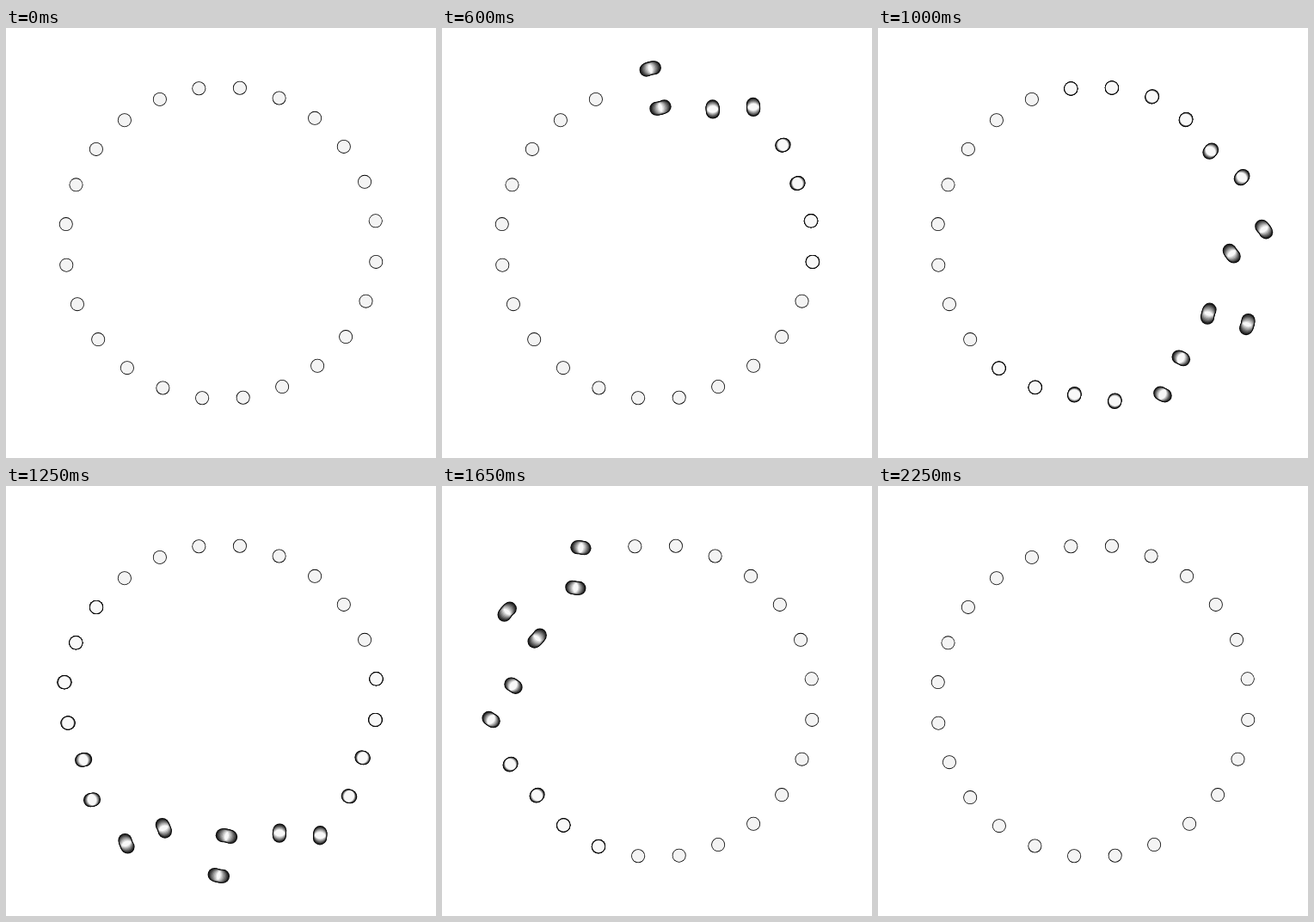
An HTML page with a canvas for the animation above (2.4 s loop, 500 px wide and 500 px high).

```html
<!DOCTYPE html>
<html lang="en">
<head>
<meta charset="utf-8">
<title>Turning pairs</title>
<style>
  html, body { margin: 0; width: 100%; height: 100%; overflow: hidden; background: #fff; }
  canvas { display: block; }
</style>
</head>
<body>
<canvas id="stage" width="500" height="500"></canvas>
<script>
const ctx = document.getElementById('stage').getContext('2d');
const LOOP = 2400, STEP = 50;
const PAIRS = 12, RING = 180, ARM = 23.8;
const OUTER = 8, INNER = 7.2;
const TILT = -0.6 * Math.PI / 180;
const START = 152, DELAY = 100, TURN = 950;
const SHUTTER = 45, SAMPLES = 8;

function ease(p) {
  if (p <= 0) return 0;
  if (p >= 1) return 1;
  const a = Math.pow(p, 2.8), b = Math.pow(1 - p, 2.8);
  return a / (a + b);
}

// Neighbouring pairs make their half turn in opposite directions.
function turn(i, t) {
  const sign = i % 2 ? -1 : 1;
  return sign * Math.PI * ease((t - START - i * DELAY) / TURN);
}

function disc(x, y, r, color) {
  ctx.fillStyle = color;
  ctx.beginPath();
  ctx.arc(x, y, r, 0, Math.PI * 2);
  ctx.fill();
}

const grey = v => `rgb(${v},${v},${v})`;

// A black silhouette of the whole path, lit by every exposure in turn.
function dot(path) {
  const light = path.length > 1 ? grey(248 / path.length) : grey(244);
  for (const [x, y] of path) disc(x, y, OUTER, '#000');
  ctx.globalCompositeOperation = 'lighter';
  for (const [x, y] of path) disc(x, y, INNER, light);
  ctx.globalCompositeOperation = 'source-over';
}

function exposures(i, t) {
  const from = turn(i, t - SHUTTER / 2), to = turn(i, t + SHUTTER / 2);
  if (Math.abs(to - from) * ARM < 0.15) return [turn(i, t)];
  return Array.from({ length: SAMPLES },
    (_, k) => turn(i, t + SHUTTER * (k / (SAMPLES - 1) - 0.5)));
}

function draw(t) {
  ctx.fillStyle = '#fff';
  ctx.fillRect(0, 0, 500, 500);
  for (let i = 0; i < PAIRS; i++) {
    const place = i * 2 * Math.PI / PAIRS + TILT;
    const x = 250 + RING * Math.sin(place);
    const y = 250 - RING * Math.cos(place);
    const turns = exposures(i, t);
    for (const arm of [-ARM, ARM]) {
      dot(turns.map(a => [x + arm * Math.cos(place + a), y + arm * Math.sin(place + a)]));
    }
  }
}

const begin = performance.now();
function tick() {
  const t = (performance.now() - begin) % LOOP;
  draw(Math.floor(t / STEP) * STEP);
  requestAnimationFrame(tick);
}
tick();
</script>
</body>
</html>
```
